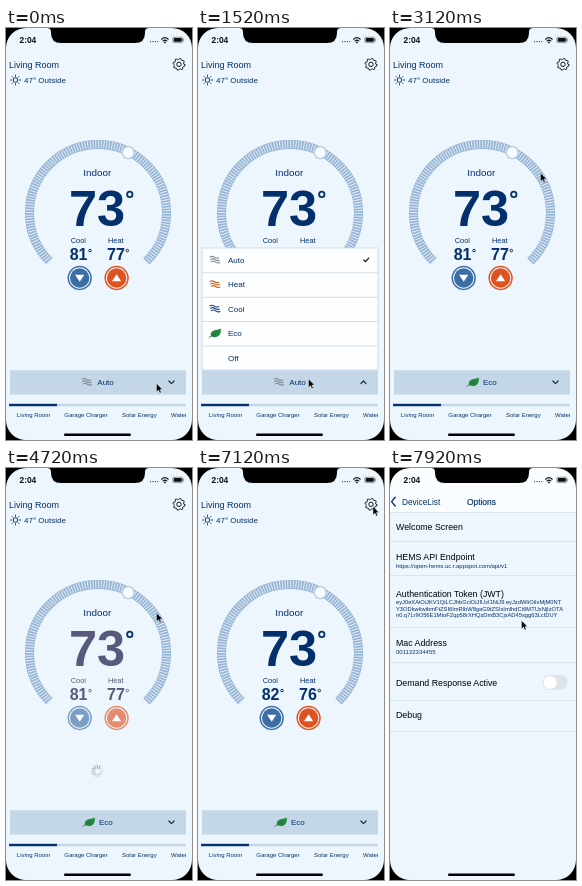
Animation, 186 px wide and 412 px high, one loop 8 s. Source, as an HTML page:

```html
<!DOCTYPE html>
<html lang="en">
<head>
<meta charset="utf-8">
<title>Thermostat</title>
<style>
  html, body { margin: 0; width: 100%; height: 100%; overflow: hidden; background: #000; }
  svg { display: block; width: 100vw; height: 100vh; font-family: "Liberation Sans", Arial, sans-serif; }
  text { white-space: pre; }
</style>
</head>
<body>
<svg id="stage" viewBox="0 0 186 412"></svg>
<script>
const LOOP = 8000;
const NAVY = '#06306a', BG = '#ecf6fc', PALE = '#c3d7e7', LINE = '#d3e2ec';
const stage = document.getElementById('stage');

const text = (x, y, size, str, fill = NAVY, extra = '') =>
  `<text x="${x}" y="${y}" font-size="${size}" fill="${fill}" ${extra}>${str}</text>`;
const rect = (x, y, w, h, fill, extra = '') =>
  `<rect x="${x}" y="${y}" width="${w}" height="${h}" fill="${fill}" ${extra}/>`;
const ring = (x, y, r, width, color = NAVY, fill = 'none') =>
  `<circle cx="${x}" cy="${y}" r="${r}" fill="${fill}" stroke="${color}" stroke-width="${width}"/>`;
const path = (d, color, width = 1, extra = '') =>
  `<path d="${d}" fill="none" stroke="${color}" stroke-width="${width}" stroke-linecap="round" stroke-linejoin="round" ${extra}/>`;

// Evenly spaced radial strokes
const spokes = (x, y, n, r1, r2, color, width, fade = 0) =>
  Array.from({ length: n }, (_, i) => {
    const a = i / n * 2 * Math.PI, c = Math.cos(a), s = Math.sin(a);
    return path(`M${x + r1 * c} ${y + r1 * s}L${x + r2 * c} ${y + r2 * s}`, color, width,
      `opacity="${1 - fade * (1 - i / n)}"`);
  }).join('');

const wind = (x, y, color) => [-2.4, 0, 2.4].map((d, i) =>
  path(`M${x - 5 + i * .6} ${y + d - .8}q2.2 -1.3 4.3 .3t4.4 .5`, color, 1.1)).join('');
const leaf = (x, y) =>
  `<path d="M${x - 4} ${y + 2.8}C${x - 5.5} ${y - 4.4} ${x + 2} ${y - 2.4} ${x + 5.8} ${y - 4.8}C${x + 6.8} ${y + 3} ${x + 1} ${y + 5.4} ${x - 4} ${y + 2.8}Z" fill="#23883f"/>` +
  path(`M${x - 6} ${y + 4}Q${x - 2} ${y + .5} ${x + 2} ${y}`, '#176b31', .8);

function gear(x, y) {
  let d = '';
  for (let i = 0; i < 32; i++) {
    const a = (i + .5) / 32 * 2 * Math.PI, r = i % 4 < 2 ? 6 : 4.8;
    d += `${i ? 'L' : 'M'}${x + r * Math.cos(a)} ${y + r * Math.sin(a)}`;
  }
  return path(d + 'Z', '#0e1a28', 1) + ring(x, y, 2.2, 1, '#0e1a28');
}

const button = (x, color, dir) =>
  ring(x, 250, 11.4, 1.5, color, '#f4f9fd') + `<circle cx="${x}" cy="250" r="9.7" fill="${color}"/>` +
  `<path d="M${x - 4.6} ${250 - 3.2 * dir}h9.2l-4.6 ${7 * dir}Z" fill="#fff"/>`;

const reading = (x, label, id) =>
  text(x + .7, 215, 7.4, label, 'inherit') +
  text(x - .3, 232, 16, '', 'inherit', `id="${id}" font-weight="bold"`) +
  ring(x + 20, 222.6, 1.3, 1);

const dial = () => {
  const d = 'M43.6 233.4A68.5 68.5 0 1 1 140.4 233.4';
  const arc = (color, width, dash = '') =>
    `<path d="${d}" pathLength="480" fill="none" stroke="${color}" stroke-width="${width}" ${dash}/>`;
  return arc('#93b3d4', 9) + arc('#e0ebf5', 7.8, 'stroke-dasharray="1.6 2.4"') +
    ring(122.2, 124.6, 6, 1.4, '#b5cbe0', '#f8fbfe');
};

const menu = () => {
  const rows = ['Auto', 'Heat', 'Cool', 'Eco', 'Off'];
  const colors = ['#858d94', '#d2601f', '#1f427f'];
  return rect(4, 220, 176, 122, '#fdfeff', `stroke="${PALE}" stroke-width=".8"`) +
    rows.map((name, i) => {
      const y = 232.2 + 24.4 * i;
      const icon = i < 3 ? wind(17, y, colors[i]) : i === 3 ? leaf(17, y) : '';
      return (i ? rect(4, y - 12.2, 176, .8, '#cbd6de') : '') + icon + text(30, y + 2.8, 8, name);
    }).join('') + path('M165.8 232l1.7 1.7l3.2 -3.5', '#111', 1.2);
};

const home = () =>
  rect(0, 0, 186, 412, BG) +
  text(3, 39.5, 9, 'Living Room') + gear(173, 36.3) +
  ring(9.5, 52, 2.2, .9) + spokes(9.5, 52, 8, 3.6, 4.9, NAVY, .9) + text(18, 55, 8, '47° Outside') +
  dial() + text(77.3, 148, 9.9, 'Indoor') + ring(123.8, 166.4, 2.7, 1.8) +
  `<g id="values">${text(63, 197.6, 50.5, '73', 'inherit', 'font-weight="bold"')}
    ${reading(64, 'Cool', 'cool')}${reading(101.3, 'Heat', 'heat')}
    ${button(73.7, '#3b6ea5', 1)}${button(110.6, '#e0521f', -1)}</g>` +
  `<g id="spinner">${spokes(0, 0, 12, 3, 6, '#8e9aa4', 1, .75)}</g>` +
  rect(4, 342.3, 176, 24.3, PALE) +
  `<g id="auto">${wind(81, 354.3, '#858d94')}${text(91.3, 357.2, 8, 'Auto')}</g>` +
  `<g id="eco">${leaf(83, 354.3)}${text(93, 357.2, 8, 'Eco')}</g>` +
  path('M-2.6 -1.3L0 1.3L2.6 -1.3', '#15273b', 1.2, 'id="chevron"') +
  `<g id="menu">${menu()}</g>` +
  rect(3, 375.8, 177, 2.4, PALE) + rect(3, 375.8, 48, 2.4, '#06336b') +
  `<g clip-path="url(#tabs)">${[[10.8, 'Living Room'], [58.3, 'Garage Charger'], [116, 'Solar Energy'], [165, 'Water Heater']]
    .map(([x, s]) => text(x, 388.8, 6, s)).join('')}</g>`;

const options = () => {
  const row = (y, s) => text(6, y, 8.8, s, '#000');
  const token = [
    'eyJ0eXAiOiJKV1QiLCJhbGciOiJIUzI1NiJ9.eyJzdWIiOiIxMjM0NT',
    'Y3ODkwIiwibmFtZSI6ImRlbW8gaG9tZSIsImlhdCI6MTUxNjIzOTA',
    'n0.q7Lr9O56E1MtoFZqp58rXHQzDmB3CjxAD45sgg63LcIDUY'];
  return rect(-3, 0, 189, 412, BG) + rect(-3, 0, 189, 44, '#fafdff') +
    [44, 73, 107, 159, 194, 232, 263].map(y => rect(-3, y, 189, .8, LINE)).join('') +
    path('M5.2 29.2L1.6 33.6L5.2 38', NAVY, 1.4) +
    text(12, 36.8, 8.3, 'DeviceList') + text(77, 36.8, 8.4, 'Options', NAVY, `stroke="${NAVY}" stroke-width=".15"`) +
    row(62, 'Welcome Screen') +
    row(92, 'HEMS API Endpoint') + text(6, 99.5, 5.92, 'https://open-hems.uc.r.appspot.com/api/v1') +
    row(128.5, 'Authentication Token (JWT)') + token.map((s, i) => text(6, 136 + 6.6 * i, 5.75, s)).join('') +
    row(178, 'Mac Address') + text(6, 186, 6, '001122334455') +
    row(217.5, 'Demand Response Active') +
    rect(152.5, 207, 25, 15, '#dde3e8', 'rx="7.5"') + ring(160.2, 214.5, 6.9, .4, '#cbd3d9', '#fff') +
    row(250, 'Debug');
};

const statusBar = () =>
  text(13.5, 15.3, 8.4, '2:04', '#0d1013', 'font-weight="bold"') +
  [144.5, 146.9, 149.3, 151.7].map(x => `<circle cx="${x}" cy="13.6" r=".65" fill="#333"/>`).join('') +
  path('M155.6 11.2Q158.9 8.2 162.2 11.2M157 12.9Q158.9 11.2 160.8 12.9', '#111', 1.2) +
  `<circle cx="158.9" cy="14.4" r=".9" fill="#111"/>` +
  rect(166.8, 9.2, 10, 5.4, 'none', 'rx="1.3" stroke="#555" stroke-width=".6"') +
  rect(167.7, 10.1, 8.2, 3.6, '#111', 'rx=".7"') + rect(177.3, 10.9, .8, 2, '#555');

const bezel = () =>
  `<path d="M0 0H186V412H0ZM20 0A20 20 0 0 0 0 20V392A20 20 0 0 0 20 412H166A20 20 0 0 0 186 392V20A20 20 0 0 0 166 0Z" fill="#000" fill-rule="evenodd"/>
   <path d="M41 0Q45 0 45 4V5Q45 15 55 15H129Q139 15 139 5V4Q139 0 143 0Z" fill="#000"/>` +
  rect(58, 405.5, 67, 2.4, '#000', 'rx="1.2"');

stage.innerHTML = `
  <defs>
    <clipPath id="tabs"><rect x="3" y="378" width="177" height="16"/></clipPath>
  </defs>
  <g id="home">${home()}</g>
  ${rect(0, 0, 186, 412, '#000', 'id="shade"')}
  <g id="options">${options()}</g>
  ${statusBar()}${bezel()}
  <path id="cursor" d="M0 0V8.4L2 6.6L3.3 9.5L4.7 8.9L3.4 6.1H6Z" fill="#000" stroke="#fff" stroke-width=".4"/>`;

const el = {};
stage.querySelectorAll('[id]').forEach(node => el[node.id] = node);

const ramp = (t, a, b) => Math.min(1, Math.max(0, (t - a) / (b - a)));
const smooth = p => p * p * (3 - 2 * p);
const show = (node, on) => node.setAttribute('opacity', +on);
const place = (node, x, y, more = '') => node.setAttribute('transform', `translate(${x} ${y})${more}`);

// Pointer moves: start, end, x, y
const moves = [[760, 1120, 110.5, 351], [1640, 1960, 41, 304], [2480, 3040, 150.5, 145],
  [6160, 6720, 175, 38.5], [7560, 7880, 131.5, 152.5]];

function draw(t) {
  let x = 150.5, y = 355.5;
  for (const [a, b, nx, ny] of moves) {
    const p = smooth(ramp(t, a, b));
    x += (nx - x) * p;
    y += (ny - y) * p;
  }
  place(el.cursor, x, y);

  const open = ramp(t, 1200, 1320) - ramp(t, 2120, 2240);
  show(el.menu, open);
  place(el.chevron, 165.5, 354.3, open > .5 ? ' scale(1 -1)' : '');
  const eco = t >= 2120;
  show(el.auto, !eco);
  show(el.eco, eco);

  const busy = ramp(t, 3920, 4080) - ramp(t, 5280, 5400);
  show(el.values, 1 - .36 * busy);
  el.values.setAttribute('fill', busy > .5 ? '#080235' : '#03306a');
  show(el.spinner, busy);
  place(el.spinner, 91.3, 303, ` rotate(${Math.floor(t / 80) * 30})`);
  const done = t >= 5280;
  el.cool.textContent = done ? '82' : '81';
  el.heat.textContent = done ? '76' : '77';

  const slide = 1 - (1 - ramp(t, 7400, 7900)) ** 3;
  place(el.home, -55.8 * slide, 0);
  place(el.options, 196 * (1 - slide), 0);
  show(el.shade, .1 * slide);
}

const start = performance.now();
function tick() {
  draw((performance.now() - start) % LOOP);
  requestAnimationFrame(tick);
}
tick();
</script>
</body>
</html>
```
